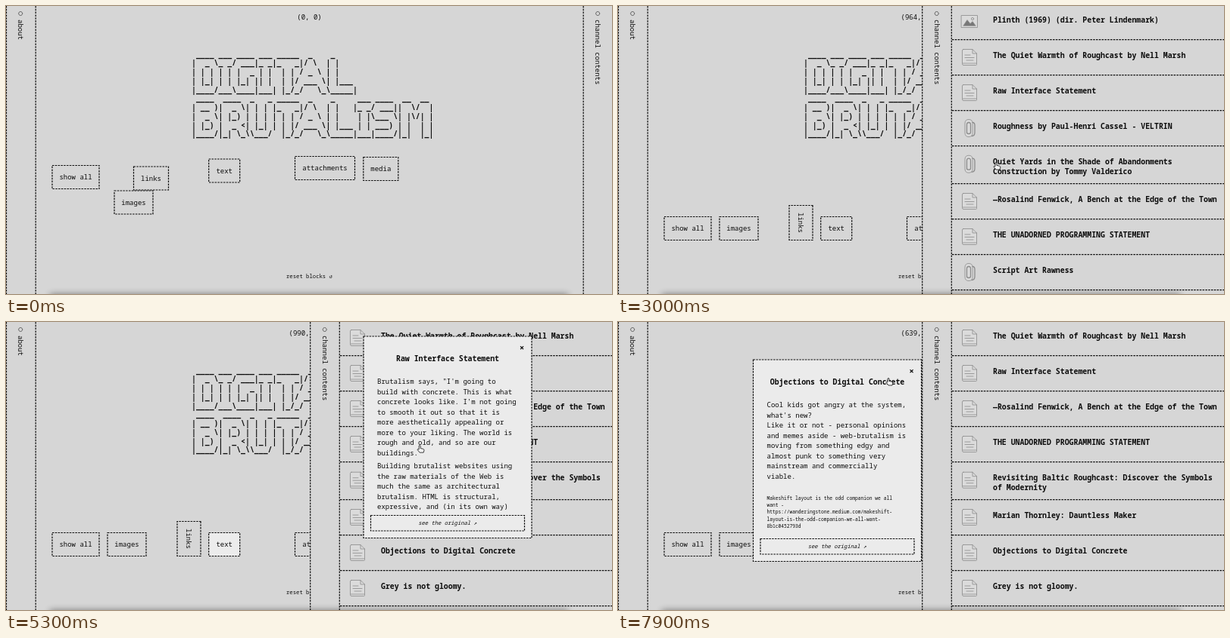
Write an HTML page that moves like this. It is 800x382 px and loops after 8000 ms.

```html
<!DOCTYPE html>
<html lang="en">
<head>
<meta charset="utf-8">
<title>Digital Brutalism</title>
<style>
  html, body { margin: 0; width: 100%; height: 100%; overflow: hidden; background: #d6d6d6; }
  svg { display: block; width: 800px; height: 382px; }
  text { font-family: "Noto Sans Mono", "DejaVu Sans Mono", monospace; font-weight: 500; fill: #0c0c0c;
         white-space: pre; font-variant-ligatures: none; }
  .b { font-weight: 700; }
  .i { font-style: italic; }
  .dash { stroke: #0c0c0c; stroke-width: 1.2; stroke-dasharray: 2.5 1.3; fill: none; }
  .icon { stroke: #8b8b8b; stroke-width: .8; fill: #dbdbdb; stroke-linejoin: round; stroke-linecap: round; }
</style>
</head>
<body>
<script>
const BG = '#d6d6d6', LIGHT = '#ececec', LOOP = 8000, SCALE = 1.79;

function el(tag, attrs, parent, content) {
  const node = document.createElementNS('http://www.w3.org/2000/svg', tag);
  for (const k in attrs) node.setAttribute(k, attrs[k]);
  if (content) node.textContent = content;
  parent.append(node);
  return node;
}
const svg = el('svg', { viewBox: '0 0 800 382' }, document.body);
const group = parent => el('g', {}, parent);
const rect = (p, x, y, width, height, attrs) => el('rect', { x, y, width, height, ...attrs }, p);
const line = (p, d) => el('path', { d, class: 'dash' }, p);
// y is the visual middle of the line
const text = (p, x, y, size, str, attrs) =>
  el('text', { x, y: y + size * .34, 'font-size': size, ...attrs }, p, str);
const mid = { 'text-anchor': 'middle' };
const show = (node, on) => node.setAttribute('display', on ? 'inline' : 'none');
const move = (node, x, y, turn = 0) =>
  node.setAttribute('transform', `translate(${x} ${y}) rotate(${turn})`);

function sideLabel(p, x, str) {
  el('circle', { cx: x - .3, cy: 10, r: 2.5, fill: 'none', stroke: '#222', 'stroke-width': .8,
    'stroke-dasharray': '1.5 .45' }, p);
  move(text(p, 0, 0, 9, str), x, 18, 90);
}

// main area
const main = group(svg);
rect(main, 0, 0, 800, 382, { fill: BG });
line(main, 'M.5 0V382');
line(main, 'M39.2 0V382');
sideLabel(main, 19.5, 'about');
const coords = text(main, 400.5, 15, 9, '', mid);
text(main, 370, 359, 7.25, 'reset blocks ↺');

String.raw`
 ____ ___ ____ ___ _____  _    _
|  _ \_ _/ ___|_ _|_   _|/ \  | |
| | | | | |  _ | |  | | / _ \ | |
| |_| | | |_| || |  | |/ ___ \| |___
|____/___\____|___| |_/_/   \_\_____|
 ____  ____  _   _ _____  _    _     ___ ____  __  __
| __ )|  _ \| | | |_   _|/ \  | |   |_ _/ ___||  \/  |
|  _ \| |_) | | | | | | / _ \ | |    | |\___ \| |\/| |
| |_) |  _ <| |_| | | |/ ___ \| |___ | | ___) | |  | |
|____/|_| \_\\___/  |_/_/   \_\_____|___|____/|_|  |_|`
  .slice(1).split('\n').forEach((row, i) =>
    el('text', { x: 245, y: 67.6 + 11.75 * i, 'font-size': 9.87, class: 'b' }, main, row));

// falling filter blocks: label, width, x, y, resting x
const blocks = [
  ['show all', 62, 92, 227, 92],
  ['images', 51, 168.5, 260.5, 159.5],
  ['links', 46, 191.5, 228.5, 241.5],
  ['text', 41, 288.2, 218.5, 288.2],
  ['attachments', 79, 421, 215, 421],
  ['media', 46, 494.8, 216, 494.8]
].map(([name, w, x, y, endX]) => {
  const g = group(main);
  const box = rect(g, -w / 2, -15.5, w, 31, { class: 'dash', style: 'fill:' + BG });
  text(g, 0, .3, 9, name, mid);
  return { name, g, box, x, y, endX };
});
const linkPath = [[0, 191.5, 228.5, 0], [200, 203, 256, 22], [400, 217, 279, 52],
  [600, 232, 284, 76], [900, 241.5, 287.5, 90]];

// channel panel, placed where it sits when open
const panel = group(svg);
rect(panel, 401.5, 0, 800, 382, { fill: BG });
const glow = rect(panel, 440, 0, 360, 47, { fill: LIGHT });
line(panel, 'M401.7 0V382');
line(panel, 'M440.3 0V382');
sideLabel(panel, 421, 'channel contents');

const tops = [-2, 45, 92, 139, 186, 236, 283, 330, 377];
tops.slice(1).forEach(y => line(panel, `M441 ${y - .3}H800`));

const icons = {
  doc(p) {
    el('path', { d: 'M-8-10H4L9.5-4.500V10Q9.500 11 8.500 11H-8Q-9.500 11-9.500 9V-8.500Q-9.500-10-8-10Z' }, p);
    el('path', { d: 'M4-10V-4.500H9.500M-6-2.500H1M-6 1H6M-4 4.500H5M-9 8.500H9', fill: 'none' }, p);
  },
  clip(p) {
    el('path', { d: 'M-6-6Q-6-11-1-11T4-6V7Q4 12-1 12T-6 7Z' }, p);
    el('path', { d: 'M-3.500 7V-4Q-3.500-7-1-7T1.500-4V6Q1.500 8-1 8T-3.500 6M4-7Q7-7 7-3V6Q7 11 3 11', fill: 'none',
      'stroke-width': 1.3 }, p);
  },
  image(p) {
    rect(p, -10.5, -8, 21, 16, {});
    el('path', { d: 'M-8 5.500L-3-2L1 3L4 0L8 5.500Z', fill: '#777' }, p);
    el('circle', { cx: 4, cy: -3.5, r: 1.6 }, p);
  }
};

function list(items) {
  const g = group(panel);
  items.forEach(([icon, ...lines], i) => {
    const art = el('g', { class: 'icon' }, g);
    move(art, 464, tops[i] + 22.5 + lines.length * .7 - .7);
    icons[icon](art);
    lines.forEach((str, n) => text(g, 495, tops[i] + 20.5 + 13 * n, 9.87, str, { class: 'b' }));
  });
  return g;
}
const warmth = ['doc', 'The Quiet Warmth of Roughcast by Nell Marsh'];
const raw = ['doc', 'Raw Interface Statement'];
const bench = ['doc', '—Rosalind Fenwick, A Bench at the Edge of the Town'];
const plain = ['doc', 'THE UNADORNED PROGRAMMING STATEMENT'];
const objection = 'Objections to Digital Concrete';
const allItems = list([
  ['image', 'Plinth (1969) (dir. Peter Lindenmark)'], warmth, raw,
  ['clip', 'Roughness by Paul-Henri Cassel - VELTRIN'],
  ['clip', 'Quiet Yards in the Shade of Abandonments', 'Construction by Tommy Valderico'],
  bench, plain, ['clip', 'Script Art Rawness']
]);
const textItems = list([
  warmth, raw, bench, plain,
  ['doc', 'Revisiting Baltic Roughcast: Discover the Symbols', 'of Modernity'],
  ['doc', 'Marian Thornley: Dauntless Maker'],
  ['doc', objection], ['doc', 'Grey is not gloomy.']
]);

// soft shadow along the lower edge
const blur = el('filter', { id: 'soft', x: '-10%', y: '-200%', width: '120%', height: '500%' }, svg);
el('feGaussianBlur', { stdDeviation: 4.5 }, blur);
rect(svg, 58, 382, 684, 20, { fill: '#000', opacity: .42, filter: 'url(#soft)' });

// floating cards
function card(title, body, note) {
  const g = group(svg);
  rect(g, 0, 0, 222, 267.5, { class: 'dash', style: 'fill:#ebebeb' });
  text(g, 209, 15, 11, '×', { ...mid, class: 'b' });
  text(g, 111, 29.5, 9.87, title, { ...mid, class: 'b' });
  body.forEach(([y, ...rows]) => rows.forEach((s, i) => text(g, 18, y + 13.5 * i, 9, s)));
  note.forEach((s, i) => text(g, 18, 183.5 + 9.3 * i, 6.28, s));
  rect(g, 9.5, 237.5, 203, 20.5, { class: 'dash', style: 'fill:#ebebeb' });
  text(g, 111, 247.7, 7.2, 'see the original ↗', { ...mid, class: 'i' });
  return g;
}
const cardA = card(raw[1], [
  [60, 'Brutalism says, "I\'m going to', 'build with concrete. This is what',
    'concrete looks like. I\'m not going', 'to smooth it out so that it is',
    'more aesthetically appealing or', 'more to your liking. The world is',
    'rough and old, and so are our', 'buildings."'],
  [172, 'Building brutalist websites using', 'the raw materials of the Web is',
    'much the same as architectural', 'brutalism. HTML is structural,',
    'expressive, and (in its own way)']
], []);
move(cardA, 472, 19);
const cardB = card(objection, [
  [60, 'Cool kids got angry at the system,', 'what\'s new?', 'Like it or not - personal opinions',
    'and memes aside - web-brutalism is', 'moving from something edgy and',
    'almost punk to something very', 'mainstream and commercially', 'viable.']
], ['Makeshift layout is the odd companion we all', 'want -',
  'https://wanderingstone.medium.com/makeshift-',
  'layout-is-the-odd-companion-we-all-want-', '8b1c0452793d']);
const cardBPath = [[7300, 358, 59.5], [7400, 300, 57], [7500, 230, 53], [7600, 178.5, 50]];

const status = group(svg);
rect(status, -3, 372, 82.5, 13, { rx: 2, fill: '#3a3a3a' });
text(status, 2, 377.3, 7, 'are.na/block/34088791',
  { style: 'font-family:Roboto,sans-serif;font-weight:400;fill:#e4e4e4' });

// pointer
const cross = el('path', { d: 'M-3.500 0H3.500M0-3.500V3.500', stroke: '#444', 'stroke-width': .8 }, svg);
const hand = el('path', {
  d: 'M-1 0Q0-1.200 1 0V3.400L4.500 4.200Q6 4.700 5.800 6.200L5 9H0L-3 5.300Q-3.400 4-1 4.800Z',
  fill: '#f4f4f4', stroke: '#111', 'stroke-width': .8, 'stroke-linejoin': 'round'
}, svg);
const pointerPath = [
  [1000, 256, 120], [1050, 331.3, 164.8], [1290, 331.3, 164.8], [1700, 600, 290], [2000, 775, 362],
  [2300, 781, 240], [2500, 770, 235], [2950, 538.6, 214], [3000, 499, 208], [3100, 499, 208],
  [3600, 300, 294], [3900, 297, 296], [4200, 297, 296], [4540, 588.3, 75], [5000, 588.3, 75],
  [5700, 490, 283], [5800, 490, 283], [5900, 487.7, 309], [6150, 487.7, 309], [6750, 678, 37],
  [6900, 680, 35], [7250, 476, 92], [7300, 462, 90], [7600, 294, 81], [7840, 357, 75]
];

// linear steps: [time, ...values]
function at(path, t) {
  if (t <= path[0][0]) return path[0].slice(1);
  const i = path.findIndex(k => k[0] > t);
  if (i < 0) return path[path.length - 1].slice(1);
  const a = path[i - 1], b = path[i], u = (t - a[0]) / (b[0] - a[0]);
  return a.slice(1).map((v, n) => v + (b[n + 1] - v) * u);
}
const clamp = v => Math.min(1, Math.max(0, v));
const fade = (t, start) => 1 - (1 - clamp((t - start) / 320)) ** 2;
const inside = (x, y, l, top) => x > l && x < l + 222 && y > top && y < top + 267.5;

function render(t) {
  const n = t / 100;
  for (const b of blocks) {
    if (b.name === 'links') { move(b.g, ...at(linkPath, t)); continue; }
    const y = Math.min(295, b.y + 14 * n + 4 * n * n);
    move(b.g, b.x + (b.endX - b.x) * clamp(t / 300), y);
    if (b.name === 'text') b.box.style.fill = t >= 3700 ? LIGHT : BG;
  }

  const [x, y] = at(pointerPath, t);
  const past = at(pointerPath, t - 50).map(v => Math.round(v * SCALE));
  coords.textContent = t < 1000 ? '(0, 0)' : `(${past.join(', ')})`;

  const slide = 360.5 * (1 - clamp((t - 2300) / 400)) ** 2;
  move(panel, slide, 0);
  show(allItems, t < 3700);
  show(textItems, t >= 3700);

  const [bx, by] = at(cardBPath, t);
  cardA.setAttribute('opacity', fade(t, 4700) * (1 - fade(t, 6850)));
  cardB.setAttribute('opacity', fade(t, 5900));
  move(cardB, bx, by);
  const onCard = t > 4750 && t < 6900 && inside(x, y, 472, 19) || t > 5950 && inside(x, y, bx, by);

  const row = tops.findIndex((top, i) => y >= top && y < tops[i + 1]);
  const hover = t > 3050 && x > 441 && row >= 0 && !onCard;
  show(glow, hover);
  if (hover) {
    glow.setAttribute('y', tops[row]);
    glow.setAttribute('height', tops[row + 1] - tops[row]);
  }
  show(status, t >= 6000 && t < 6800 );

  const onBlock = x > 268 && x < 309 && y > 279 && y < 311;
  const useHand = onCard || onBlock || x > 401.5 + slide;
  show(hand, t >= 1000 && useHand);
  show(cross, t >= 1000 && !useHand);
  move(hand, x, y);
  move(cross, x, y);
}

const start = performance.now();
(function tick() {
  const t = (performance.now() - start) % LOOP;
  render(Math.floor(t / 100) * 100);
  requestAnimationFrame(tick);
})();
</script>
</body>
</html>
```
